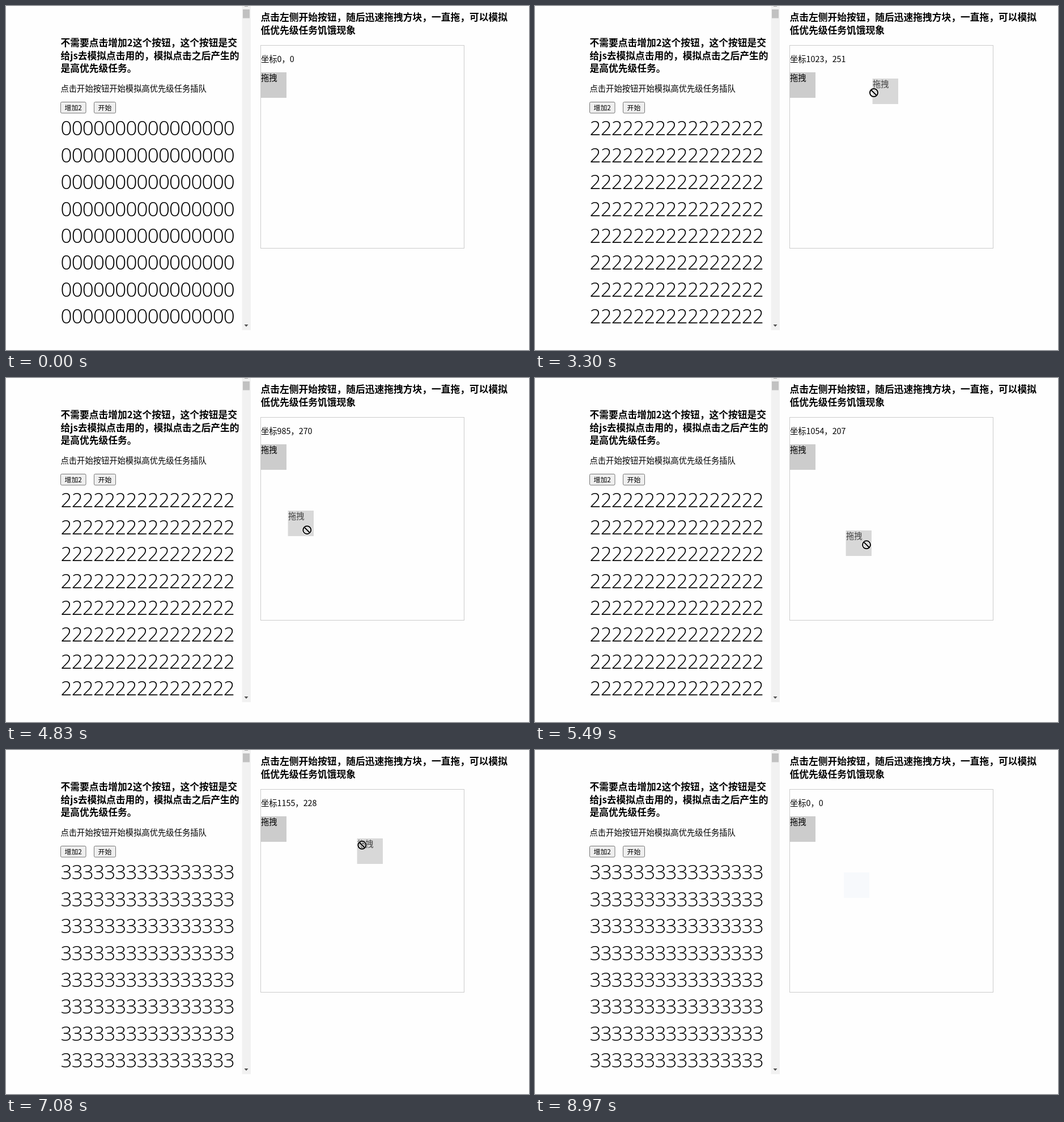
An HTML page for the animation above (9.78 s loop, 923x607 px).

```html
<!DOCTYPE html>
<html lang="zh-CN">
<head>
<meta charset="utf-8">
<title>任务优先级演示</title>
<style>
  html, body { margin: 0; width: 100%; height: 100%; overflow: hidden; background: #fefefe; }
  svg { display: block; font-family: "Noto Sans CJK SC", "Noto Sans CJK", sans-serif; font-size: 14.3px; }
  .head { font-size: 16.75px; font-weight: 700; }
  .btn { font-size: 11.9px; }
  .btn rect { fill: #efefef; stroke: #767676; }
  .btn.hover rect { fill: #e5e5e5; stroke: #4f4f4f; }
  .rows { font: 350 35px "Open Sans", "Noto Sans", sans-serif; letter-spacing: -.82px; }
</style>
</head>
<body>
<svg width="923" height="607" viewBox="0 0 923 607">
  <g class="head">
    <text x="96.5" y="71.3">不需要点击增加2这个按钮，这个按钮是交</text>
    <text x="96.5" y="93.6">给js去模拟点击用的，模拟点击之后产生的</text>
    <text x="96.5" y="116">是高优先级任务。</text>
    <text x="449.5" y="26.2">点击左侧开始按钮，随后迅速拖拽方块，一直拖，可以模拟</text>
    <text x="449.5" y="48.8">低优先级任务饥饿现象</text>
  </g>
  <text x="96.5" y="151.4">点击开始按钮开始模拟高优先级任务插队</text>
  <g class="btn">
    <rect x="96.5" y="169.5" width="44.5" height="19.5" rx="2"/>
    <text x="103.5" y="184">增加2</text>
  </g>
  <g class="btn" id="start">
    <rect x="155.5" y="169.5" width="38" height="19.5" rx="2"/>
    <text x="162.5" y="184">开始</text>
  </g>
  <g class="rows" id="rows"></g>

  <rect x="416.5" width="15.5" height="572" fill="#f1f1f1"/>
  <rect x="418" y="6" width="12" height="15.5" fill="#c1c1c1"/>
  <path d="M420.5 562h7l-3.5 4z" fill="#505050"/>
  <path d="M421 0h6v1h-6z" fill="#a3a3a3"/>

  <rect x="449.5" y="69.5" width="359" height="358" fill="none" stroke="#ccc"/>
  <text id="coord" x="450" y="99.4"></text>
  <g id="tile">
    <rect x="449.6" y="117" width="45.4" height="45" fill="#ccc"/>
    <text x="450" y="132.4">拖拽</text>
  </g>
  <rect id="trace" x="545" y="216" width="45" height="45" fill="#f7f9fc"/>
  <use id="ghost" href="#tile"/>
  <path id="arrow" fill="#fff" stroke="#000" stroke-width="1.1"
    d="M.5 .5V14.6L3.7 11.6L6 16.5L8.1 15.6L5.9 10.7H10.3Z"/>
  <g id="ban" fill="none">
    <path id="ring" d="M-7 0a7 7 0 1 1 14 0a7 7 0 1 1-14 0M-5-5L5 5" stroke="#fff" stroke-width="3.6"/>
    <use href="#ring" id="ringTop"/>
    <path d="M-7 0a7 7 0 1 1 14 0a7 7 0 1 1-14 0M-5-5L5 5" stroke="#000" stroke-width="2"/>
  </g>
</svg>
<script>
const LOOP = 9780, STEP = 30, ENTER = 180, GRAB = 2520, DROP = 8370, EXIT = 8970;
const $ = id => document.getElementById(id);
const clamp = v => Math.min(1, Math.max(0, v));
const ease = v => clamp(v) ** 2 * (3 - 2 * clamp(v));

// time, x, y of the arrow before the drag
const arrive = [
  [ENTER, 887, 20], [300, 498, 62], [390, 225, 163], [480, 172, 181],
  [1110, 172, 181], [1260, 385, 136], [1440, 435, 127], [1560, 497, 172],
  [1800, 553, 190], [1950, 612, 203], [2010, 617, 150], [2250, 516, 140], [GRAB, 470, 142]
];

// time, centre x, centre y, turned angle of the circling tile
const orbit = [
  [GRAB, 450, 117, -394], [3300, 556, 172, 50], [4200, 543, 174, 560],
  [5490, 549, 211, 1350], [7080, 588, 211, 2230], [8280, 545, 216, 2830]
];

// time, x, y of the rare coordinate refreshes
const refreshes = [
  [0, 0, 0], [2700, 1023, 251], [3900, 1085, 217], [4800, 985, 270],
  [5250, 1054, 207], [6600, 1155, 228], [7500, 1112, 273], [DROP, 0, 0]
];

function track(keys, t) {
  const i = Math.max(1, keys.findIndex(k => k[0] > t));
  const [a, b] = [keys[i - 1], keys[i]];
  const k = clamp((t - a[0]) / (b[0] - a[0]));
  return a.slice(1).map((v, j) => v + (b[j + 1] - v) * k);
}

// The pointer runs ahead of the tile along the circle.
function drag(t) {
  const [cx, cy, deg] = track(orbit, Math.min(t, 8279));
  const size = ease((t - GRAB) / 400) * ease((8280 - t) / 700);
  const rx = (62 + 33 * clamp((t - 4200) / 2880)) * size, ry = 58 * size;
  const a = deg * Math.PI / 180;
  const ahead = a + (40 - (t - 3300) * .0188) * Math.PI / 180;
  const x = Math.round(cx + rx * Math.cos(a)), y = Math.round(cy - ry * Math.sin(a));
  return {
    box: [x, y],
    ban: [x + 19 - 17 * size * Math.sin(ahead), y + 25 - 17 * size * Math.cos(ahead)]
  };
}

function leave(t) {
  const k = clamp((t - DROP) / (EXIT - DROP)) ** 3;
  return [566 + 364 * k, 241 - 80 * k];
}

function show(el, on, [x, y] = [0, 0]) {
  el.style.display = on ? "" : "none";
  if (on) el.setAttribute("transform", `translate(${x.toFixed(1)} ${y.toFixed(1)})`);
}

function setText(el, s) {
  if (el.textContent !== s) el.textContent = s;
}

$("ringTop").remove();
const rows = Array.from({ length: 8 }, (_, i) => {
  const el = document.createElementNS("http://www.w3.org/2000/svg", "text");
  el.setAttribute("x", 96.5);
  el.setAttribute("y", 228.3 + i * 47.4);
  return $("rows").appendChild(el);
});

function draw(now) {
  const t = Math.floor(now % LOOP / STEP) * STEP;
  const dragging = t >= GRAB && t < DROP;
  const { box, ban } = drag(t);
  const digit = t < GRAB ? "0" : t < 6750 ? "2" : "3";
  rows.forEach(r => setText(r, digit.repeat(16)));
  const [, x, y] = refreshes.filter(r => r[0] <= t).pop();
  setText($("coord"), `坐标${x}，${y}`);

  const fade = 1 - clamp((t - DROP) / 150);
  show($("ghost"), t >= GRAB && fade > 0, [box[0] - 450, box[1] - 117]);
  $("ghost").setAttribute("opacity", .74 * fade);
  show($("trace"), t >= DROP);

  const tip = t < GRAB ? track(arrive, t) : leave(t);
  show($("arrow"), t >= ENTER && t < EXIT && !dragging, tip);
  show($("ban"), dragging, ban);
  $("start").classList.toggle("hover",
    t >= ENTER && tip[0] > 155 && tip[0] < 194 && tip[1] > 169 && tip[1] < 190);
}

const origin = performance.now();
function tick() {
  draw(performance.now() - origin);
  requestAnimationFrame(tick);
}
tick();
</script>
</body>
</html>
```
